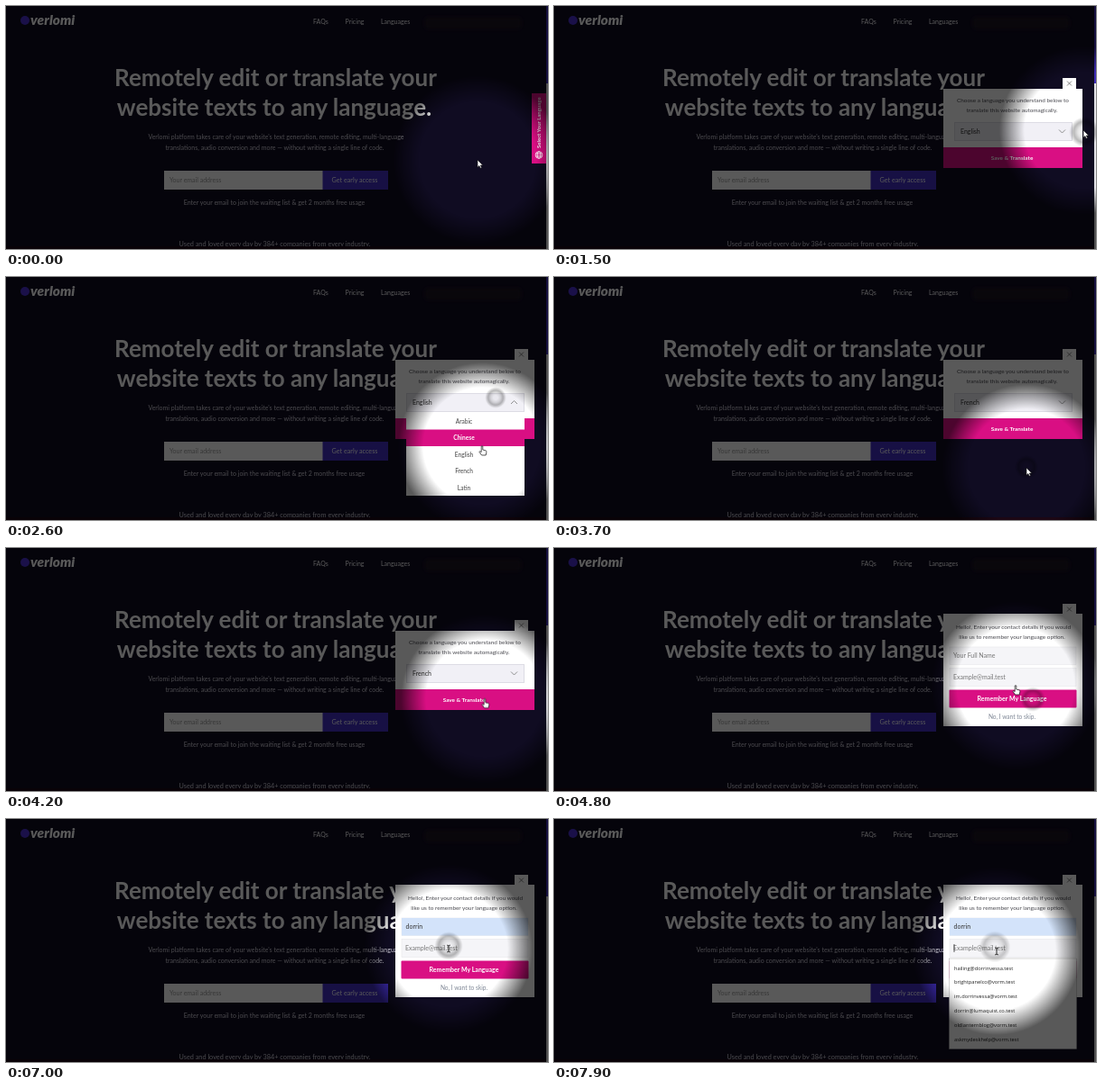
These frames come from a looping animation (600 by 270 pixels, 8000 ms). An HTML page:

```html
<!DOCTYPE html>
<html lang="en">
<head>
<meta charset="utf-8">
<title>Language picker demo</title>
<style>
html, body { margin: 0; width: 100%; height: 100%; overflow: hidden; background: #06040c; }
svg { display: block; width: 600px; height: 270px; font: 7px Lato, sans-serif; }
.mid { text-anchor: middle; }
.b { font-weight: 700; }
.h1 { font-size: 26px; font-weight: 700; }
.logo { font: italic 900 15.5px Lato, sans-serif; }
.note { font-size: 6.4px; fill: #4a4a50; }
.sys { font: 5.7px "Open Sans", sans-serif; fill: #222; }
.pink { fill: #d90f83; }

/* Continuous motion */
.follow { animation: path 8s ease-in-out infinite; }
.slide { animation: slide 8s ease-out infinite; }
.tab { animation: tab 8s ease-in infinite; }
.ripple { opacity: 0; transform-box: fill-box; transform-origin: center; animation: ripple 8s linear var(--at) infinite backwards; }

/* Hard switches */
.sw { animation: 8s step-end infinite; }
.first { animation-name: first; }
.second { animation-name: second; }
.list { animation-name: list; }
.closed { animation-name: closed; }
.before { animation-name: before; }
.after { animation-name: after; }
.row1 { animation-name: row1; }
.row2 { animation-name: row2; }
.row3 { animation-name: row3; }
.row4 { animation-name: row4; }
.suggest { animation-name: suggest; }
.empty { animation-name: empty; }
.filled { animation-name: filled; }
.mails { animation-name: mails; }
.arrow { animation-name: arrow; }
.hand { animation-name: hand; }
.beam { animation-name: beam; }

@keyframes path {
  0%, 2.5% { transform: translate(522px, 171px); }
  6.25% { transform: translate(586px, 137px); }
  19% { transform: translate(586px, 138px); }
  24%, 29.5% { transform: translate(542px, 134px); }
  32.5% { transform: translate(527px, 188px); }
  38%, 47% { transform: translate(523px, 212px); }
  53%, 57.5% { transform: translate(530px, 167px); }
  60% { transform: translate(511px, 153px); }
  62% { transform: translate(471px, 138px); }
  64.5% { transform: translate(499px, 121px); }
  68%, 77% { transform: translate(507px, 119px); }
  81%, 85% { transform: translate(490px, 141px); }
  90%, 100% { transform: translate(490px, 147px); }
}
@keyframes slide { 0%, 12.5% { transform: translateX(172px); } 17%, 100% { transform: none; } }
@keyframes tab { 0%, 12% { transform: none; } 14%, 100% { transform: translateX(20px); } }
@keyframes ripple {
  0% { opacity: 0; transform: scale(.4); }
  1% { opacity: 1; }
  6.5% { opacity: 1; transform: scale(1); }
  8%, 100% { opacity: 0; transform: scale(1.1); }
}
@keyframes first { 56.25% { opacity: 0; } 100% { opacity: 0; } }
@keyframes second { 0% { opacity: 0; } 56.25% { opacity: 1; } }
@keyframes list { 0% { opacity: 0; } 29.5% { opacity: 1; } 42.5% { opacity: 0; } }
@keyframes closed { 29.5% { opacity: 0; } 42.5% { opacity: 1; } }
@keyframes before { 42.5% { opacity: 0; } }
@keyframes after { 0% { opacity: 0; } 42.5% { opacity: 1; } }
@keyframes row1 { 0% { opacity: 0; } 30.8% { opacity: 1; } 31.5% { opacity: 0; } }
@keyframes row2 { 0% { opacity: 0; } 31.5% { opacity: 1; } 33.4% { opacity: 0; } }
@keyframes row3 { 0% { opacity: 0; } 33.4% { opacity: 1; } 35.8% { opacity: 0; } }
@keyframes row4 { 0% { opacity: 0; } 35.8% { opacity: 1; } 42.5% { opacity: 0; } }
@keyframes suggest { 0% { opacity: 0; } 71.5% { opacity: 1; } 82.5% { opacity: 0; } }
@keyframes empty { 82.5% { opacity: 0; } }
@keyframes filled { 0% { opacity: 0; } 82.5% { opacity: 1; } }
@keyframes mails { 0% { opacity: 0; } 92.5% { opacity: 1; } }
@keyframes arrow {
  22.5% { opacity: 0; } 42.5% { opacity: 1; } 50.5% { opacity: 0; }
  79% { opacity: 1; } 84% { opacity: 0; }
}
@keyframes hand { 0% { opacity: 0; } 22.5% { opacity: 1; } 42.5% { opacity: 0; } 50.5% { opacity: 1; } 61.5% { opacity: 0; } }
@keyframes beam { 0% { opacity: 0; } 61.5% { opacity: 1; } 79% { opacity: 0; } 84% { opacity: 1; } }
</style>
</head>
<body>
<svg viewBox="0 0 600 270">
  <defs>
    <radialGradient id="spot" gradientUnits="userSpaceOnUse" cx="0" cy="0" r="93">
      <stop offset=".7" stop-opacity="0"/>
      <stop offset=".86" stop-opacity=".34"/>
      <stop offset="1" stop-opacity=".65"/>
    </radialGradient>
    <radialGradient id="ring">
      <stop offset=".2" stop-opacity=".03"/>
      <stop offset=".45" stop-opacity=".12"/>
      <stop offset=".7" stop-opacity=".28"/>
      <stop offset="1" stop-opacity="0"/>
    </radialGradient>
    <filter id="soft" x="-10%" y="-50%" width="120%" height="200%"><feGaussianBlur stdDeviation="2"/></filter>
    <g id="cross" fill="none" stroke="#666" stroke-width=".8"><path d="M-2.5-2.5l5 5m0-5l-5 5"/></g>
  </defs>

  <!-- Page -->
  <rect width="600" height="270" fill="#100c22"/>
  <g fill="#fff">
    <circle cx="21" cy="16" r="5" fill="#4a30d0"/>
    <text class="logo" x="27" y="21">verlomi</text>
    <text x="340" y="20">FAQs</text>
    <text x="375.500" y="20">Pricing</text>
    <text x="415" y="20">Languages</text>
    <rect x="463" y="12" width="108" height="14" rx="5" fill="#1b1824" filter="url(#soft)"/>
    <g class="mid">
      <text class="h1" x="298.500" y="89">Remotely edit or translate your</text>
      <text class="h1" x="297" y="122">website texts to any language.</text>
      <g fill="#d5d3dd">
        <text x="299" y="148">Verlomi platform takes care of your website's text generation, remote editing, multi-language</text>
        <text x="297.500" y="160">translations, audio conversion and more — without writing a single line of code.</text>
        <text x="297" y="220.500">Enter your email to join the waiting list &amp; get 2 months free usage</text>
        <text x="297.500" y="267" font-size="7.3">Used and loved every day by 384+ companies from every industry.</text>
      </g>
    </g>
    <rect x="175" y="183" width="176" height="21"/>
    <text x="181" y="196" fill="#999">Your email address</text>
    <rect x="350.500" y="183" width="72.500" height="21" fill="#4430c4"/>
    <text class="mid" x="386" y="196" font-size="7.2">Get early access</text>
  </g>
  <rect y="267" width="600" height="3" fill="#1c0714"/>
  <rect x="598" width="2" height="86" fill="#3d2bb5"/>
  <rect x="598" y="86" width="2" height="184" fill="#e4e4e8"/>

  <g class="tab">
    <rect class="pink" x="582" y="97" width="16" height="78"/>
    <text class="b" transform="translate(592.300 158) rotate(-90)" font-size="6" fill="#fff">Select Your Language</text>
    <g fill="none" stroke="#fff" stroke-width=".8">
      <circle cx="590" cy="165.500" r="3.800"/>
      <ellipse cx="590" cy="165.500" rx="1.700" ry="3.800"/>
      <path d="M586.500 164.200h7m-7 2.600h7"/>
    </g>
  </g>

  <!-- Language panel -->
  <g class="slide"><g class="sw first">
    <path d="M431 92h132v-12h15v12h7v88H431z" fill="#fff"/>
    <use href="#cross" x="570.500" y="86"/>
    <g class="mid note">
      <text x="508" y="106.500">Choose a language you understand below to</text>
      <text x="507" y="117.500">translate this website automagically.</text>
    </g>
    <rect x="443.500" y="129.500" width="130" height="20" fill="#f1f0f6" stroke="#dddce4"/>
    <text class="sw before" x="450" y="141.500" fill="#333">English</text>
    <text class="sw after" x="450" y="141.500" fill="#333">French</text>
    <path class="sw closed" d="M559 137.500l3.500 3.500 3.500-3.500" fill="none" stroke="#777" stroke-width=".8"/>
    <rect class="pink" x="431" y="157" width="154" height="23"/>
    <text class="mid b" x="507" y="171" font-size="6.4" fill="#fff">Save &amp; Translate</text>
  </g></g>

  <g class="sw list">
    <path d="M559 141l3.500-3.500 3.500 3.500" fill="none" stroke="#777" stroke-width=".8"/>
    <rect x="443" y="150" width="131" height="93" fill="#fff"/>
    <g class="mid" fill="#444" font-size="6.6">
      <text x="507" y="162.500">Arabic</text>
      <text x="507" y="181">Chinese</text>
      <text x="507" y="199.500">English</text>
      <text x="507" y="218">French</text>
      <text x="507" y="236.500">Latin</text>
    </g>
  </g>
  <g class="mid b" fill="#fff" font-size="6.6">
    <g class="sw row1"><rect class="pink" x="443" y="151" width="131" height="18.500"/><text x="507" y="162.500">Arabic</text></g>
    <g class="sw row2"><rect class="pink" x="443" y="169.500" width="131" height="18.500"/><text x="507" y="181">Chinese</text></g>
    <g class="sw row3"><rect class="pink" x="443" y="188" width="131" height="18.500"/><text x="507" y="199.500">English</text></g>
    <g class="sw row4"><rect class="pink" x="443" y="206.500" width="131" height="18.500"/><text x="507" y="218">French</text></g>
  </g>

  <!-- Contact panel -->
  <g class="sw second">
    <path d="M431 73h132v-11h15v11h7v125H431z" fill="#fff"/>
    <use href="#cross" x="570.500" y="68"/>
    <g class="mid note">
      <text x="508.500" y="89.500">Hello!, Enter your contact details if you would</text>
      <text x="507" y="100.500">like us to remember your language option.</text>
    </g>
    <g fill="#f5f5f8" stroke="#e6e6ec" stroke-width=".6">
      <rect x="438" y="110" width="140" height="19.500"/>
      <rect x="438" y="133.500" width="140" height="20"/>
    </g>
    <text class="sw empty" x="442" y="122" fill="#777">Your Full Name</text>
    <text x="442" y="146" fill="#777">Example@mail.test</text>
    <rect class="pink" x="437.500" y="157.500" width="141" height="20" rx="1"/>
    <text class="mid b" x="507" y="170" fill="#fff">Remember My Language</text>
    <text class="mid" x="507" y="189.500" font-size="6.6" fill="#7d8594">No, I want to skip.</text>
  </g>
  <g class="sw suggest">
    <rect x="437.500" y="130.500" width="141" height="23" rx="1" fill="#fff" stroke="#999" stroke-width=".8"/>
    <text class="sys b" x="443" y="143.500">Dorrin</text>
  </g>
  <g class="sw filled">
    <rect x="438" y="110" width="140" height="19.500" fill="#d3e3fa"/>
    <text x="442.500" y="122" fill="#333">dorrin</text>
  </g>
  <g class="sw mails">
    <path d="M443 139v9" stroke="#222" stroke-width=".7"/>
    <rect x="437.500" y="155" width="141" height="100.500" fill="#fff" stroke="#aaa" stroke-width=".5"/>
    <g class="sys">
      <text x="443" y="167.500">hailing@dorrinvessa.test</text>
      <text x="443" y="183.300">brightpanelco@vorm.test</text>
      <text x="443" y="199.100">im.dorrinvessa@vorm.test</text>
      <text x="443" y="214.900">dorrin@lumaquist.co.test</text>
      <text x="443" y="230.700">oldlanternblog@vorm.test</text>
      <text x="443" y="246.500">askmydeskhelp@vorm.test</text>
    </g>
  </g>

  <!-- Spotlight -->
  <rect class="follow" x="-700" y="-400" width="1400" height="800" fill="url(#spot)"/>

  <!-- Clicks -->
  <g fill="url(#ring)">
    <circle class="ripple" style="--at:1s" cx="587" cy="140" r="17"/>
    <circle class="ripple" style="--at:2.35s" cx="542" cy="134" r="17"/>
    <circle class="ripple" style="--at:3.4s" cx="523" cy="211" r="17"/>
    <circle class="ripple" style="--at:4.45s" cx="530" cy="168" r="17"/>
    <circle class="ripple" style="--at:5.7s" cx="507" cy="119" r="17"/>
    <circle class="ripple" style="--at:6.55s" cx="490" cy="141" r="17"/>
    <circle class="ripple" style="--at:7.35s" cx="488" cy="142" r="17"/>
  </g>

  <!-- Pointer -->
  <g class="follow" stroke-linejoin="round">
    <path class="sw arrow" d="M0 0v8.200l1.900-1.700 1.200 2.700 1.400-.6-1.200-2.700h2.600z" fill="#fff" stroke="#111" stroke-width=".6"/>
    <path class="sw hand" d="M-.8 0q.8-.9 1.600 0v4l3.400.9q.9.300.7 1.500l-.7 3.600h-4.600l-2.700-3.700q.4-1.300 2.300.2z" fill="#fff" stroke="#111" stroke-width=".7"/>
    <path class="sw beam" d="M-1.800-3.800q1.800 0 1.800 1v5.600q0 1-1.800 1M1.800-3.800q-1.800 0-1.800 1m0 5.600q0 1 1.800 1" fill="none" stroke="#111" stroke-width=".9"/>
  </g>
</svg>
</body>
</html>
```
